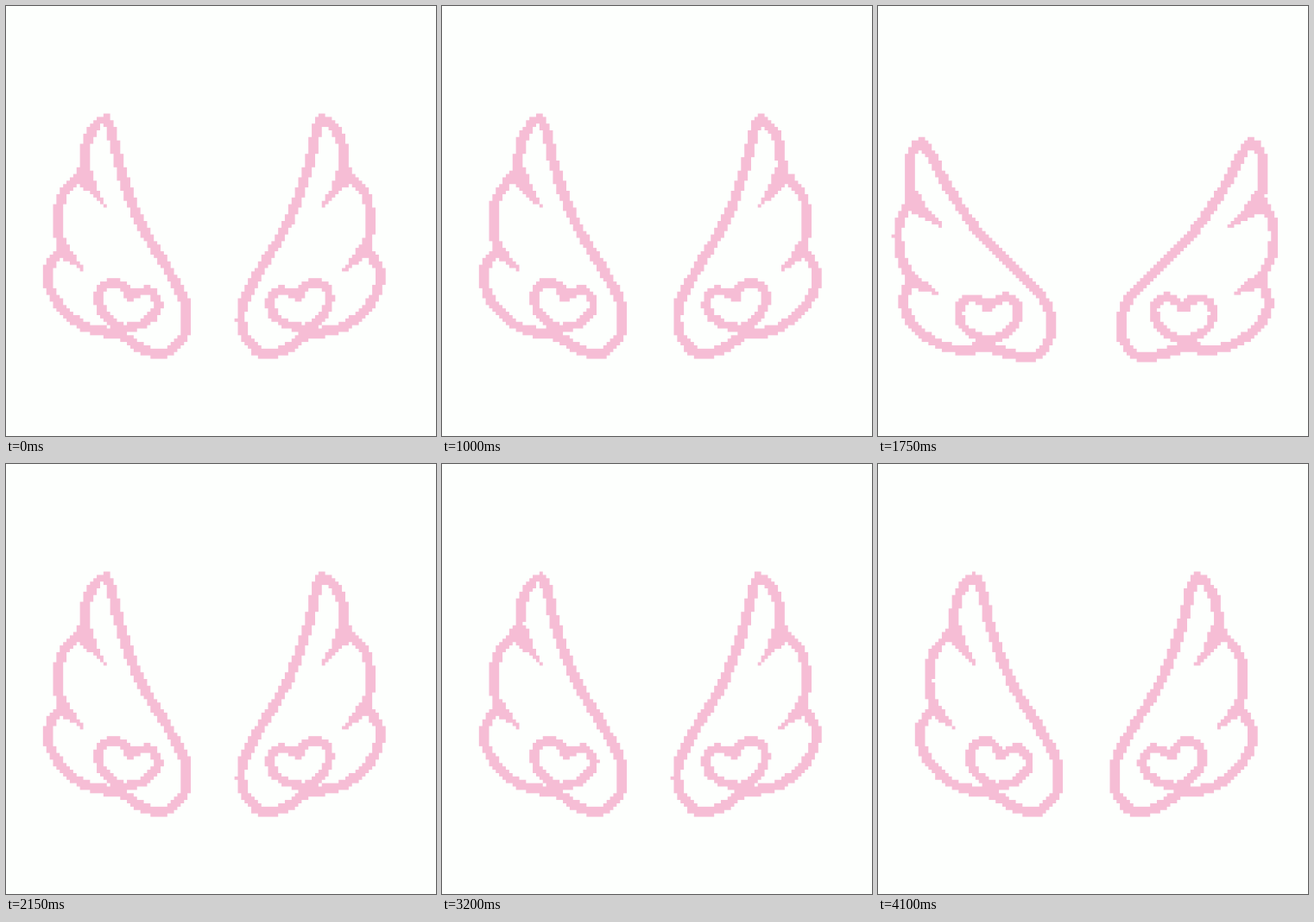
An HTML page with a canvas for the animation above (4.15 s loop, 498 by 498 pixels).

```html
<!DOCTYPE html>
<html lang="en">
<head>
<meta charset="utf-8">
<title>Wings</title>
<style>
html, body { margin: 0; width: 100%; height: 100%; overflow: hidden; background: #fdfffd; }
canvas { display: block; width: 498px; height: 498px; }
</style>
</head>
<body>
<canvas id="stage" width="498" height="498"></canvas>
<script>
const SIZE = 498, CELLS = 128, LOOP = 4150, STEP = 50, FLAPS = 4;
const PINK = '#f6bdd5', PAPER = '#fdfffd';
const PIVOT = [188, 401], SWING = 17.4 * Math.PI / 180, AXIS = 241;

const outline = [
  [90, 192], [92, 165], [101, 142], [116, 131], [124, 150], [131, 182], [146, 228],
  [163, 265], [187, 304], [206, 340], [210, 364], [202, 389], [182, 403], [160, 398],
  [130, 380], [100, 375], [72, 358], [53, 332], [49, 306], [65, 281]
];
const feather = [[65, 281], [60, 250], [66, 218], [88, 192]];
const heartLeft = [[143, 337], [136, 325], [123, 320], [108, 332], [112, 355], [134, 374]];
const heartRight = [[143, 337], [153, 331], [167, 330], [176, 347], [162, 366], [134, 374]];
const barbs = [
  [[83, 201], [97, 187], [102, 211], [115, 231]],
  [[61, 286], [69, 274], [78, 289], [90, 305]]
];

function makeCanvas(size) {
  const c = document.createElement('canvas');
  c.width = c.height = size;
  return c.getContext('2d', { willReadFrequently: size === CELLS });
}

const small = makeCanvas(CELLS);
const big = makeCanvas(CELLS * 4);
const stage = document.getElementById('stage').getContext('2d');

// Catmull-Rom spline through the points
function curve(g, pts, width) {
  const at = i => pts[Math.max(0, Math.min(pts.length - 1, i))];
  g.beginPath();
  g.moveTo(...pts[0]);
  for (let i = 0; i < pts.length - 1; i++) {
    const [a, b, c, d] = [at(i - 1), at(i), at(i + 1), at(i + 2)];
    g.bezierCurveTo(
      b[0] + (c[0] - a[0]) / 6, b[1] + (c[1] - a[1]) / 6,
      c[0] - (d[0] - b[0]) / 6, c[1] - (d[1] - b[1]) / 6, c[0], c[1]);
  }
  g.lineWidth = width;
  g.stroke();
}

function barb(g, [a, b, mid, end]) {
  g.beginPath();
  g.moveTo(...a);
  g.lineTo(...b);
  g.quadraticCurveTo(...mid, ...end);
  g.closePath();
  g.fill();
  g.lineWidth = 3;
  g.stroke();
}

function wing(g, angle) {
  g.save();
  g.translate(...PIVOT);
  g.rotate(-angle);
  g.translate(-PIVOT[0], -PIVOT[1]);
  curve(g, outline, 11.5);
  curve(g, feather, 11);
  curve(g, heartLeft, 10.5);
  curve(g, heartRight, 10.5);
  barbs.forEach(b => barb(g, b));
  g.restore();
}

// 1 = raised, 0 = spread
function lift(t) {
  const u = (1 + Math.cos(2 * Math.PI * (t * FLAPS / LOOP - 0.035))) / 2;
  return u + 0.6 * (u * u * (3 - 2 * u) - u);
}

function harden(g) {
  const img = g.getImageData(0, 0, CELLS, CELLS), d = img.data;
  for (let i = 0; i < d.length; i += 4) {
    const on = d[i + 3] > 127;
    d[i] = 246; d[i + 1] = 189; d[i + 2] = 213;
    d[i + 3] = on ? 255 : 0;
  }
  g.putImageData(img, 0, 0);
}

function draw(t) {
  const angle = SWING * (1 - lift(t));
  small.clearRect(0, 0, CELLS, CELLS);
  small.save();
  small.scale(CELLS / SIZE, CELLS / SIZE);
  small.strokeStyle = small.fillStyle = PINK;
  small.lineCap = small.lineJoin = 'round';
  wing(small, angle);
  small.translate(2 * AXIS, 0);
  small.scale(-1, 1);
  wing(small, angle);
  small.restore();
  harden(small);

  big.fillStyle = PAPER;
  big.fillRect(0, 0, CELLS * 4, CELLS * 4);
  big.imageSmoothingEnabled = false;
  big.drawImage(small.canvas, 0, 0, CELLS * 4, CELLS * 4);
  stage.drawImage(big.canvas, 0, 0, SIZE, SIZE);
}

let start = null, last = -1;
function tick(now) {
  if (start === null) start = now;
  const step = Math.floor(((now - start) % LOOP) / STEP);
  if (step !== last) draw((last = step) * STEP);
  requestAnimationFrame(tick);
}
draw(0);
requestAnimationFrame(tick);
</script>
</body>
</html>
```
